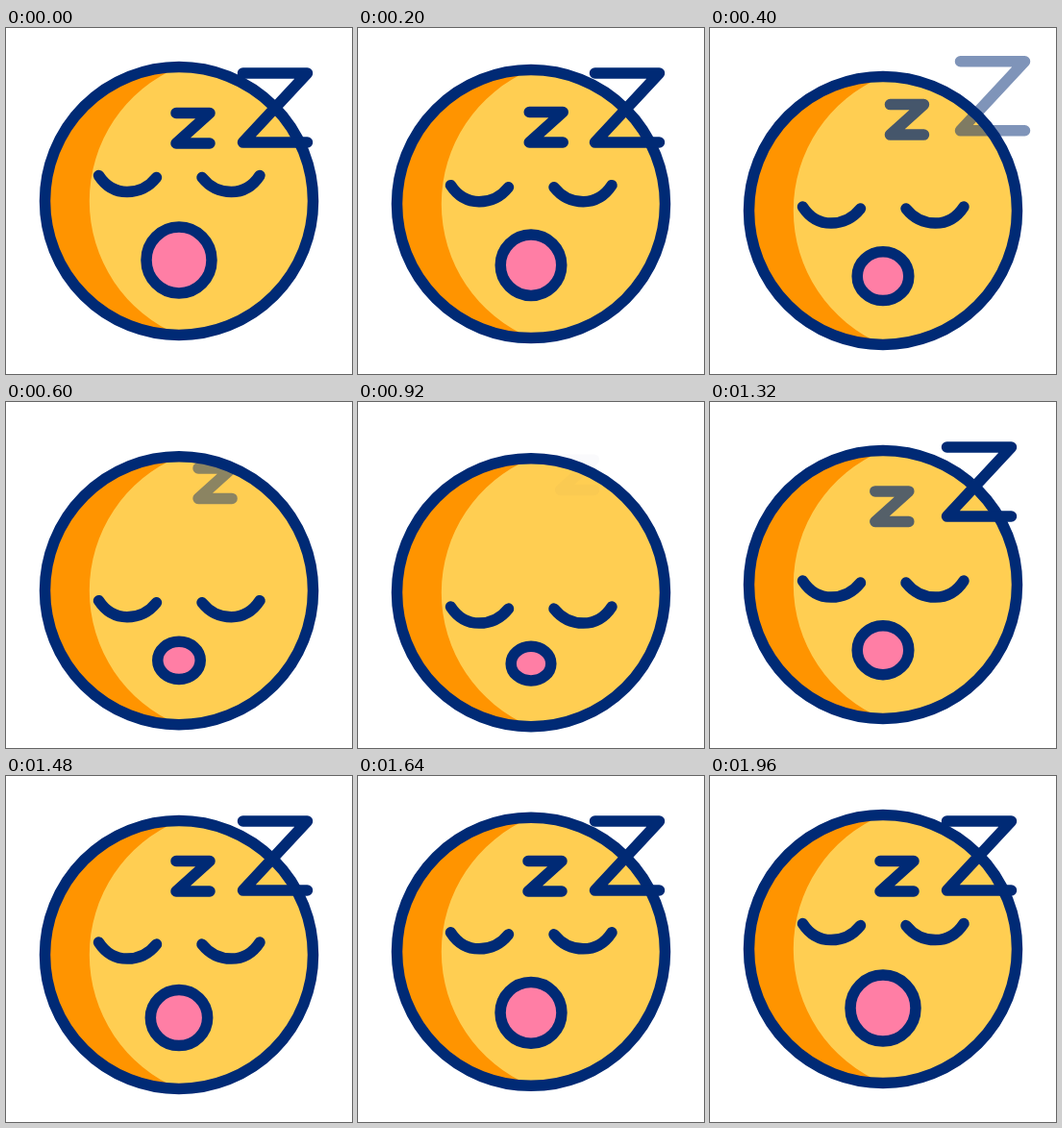
These frames come from a looping animation (360 by 360 pixels, 2000 ms). An HTML page:

```html
<!DOCTYPE html>
<html lang="en">
<head>
<meta charset="utf-8">
<title>Sleeping face</title>
<style>
html, body { margin: 0; height: 100%; overflow: hidden; background: #fff; }
svg { display: block; width: 100vw; height: 100vh; }
.line { fill: none; stroke: #002a75; stroke-width: 11.5; stroke-linecap: round; stroke-linejoin: round; }
</style>
</head>
<body>
<svg viewBox="0 0 360 360">
  <g id="face">
    <circle cx="180" cy="180" r="139.5" fill="#ffce52"/>
    <path d="M180 40.500A139.500 139.500 0 0 0 180 319.500A151 151 0 0 1 180 40.500" fill="#ff9400"/>
    <circle class="line" cx="180" cy="180" r="139.5"/>
  </g>
  <g id="eyes" class="line">
    <path id="eye" d="M96.500 153.500C103 163.500 113 170.500 126 170.500C138 170.500 149 165 156.500 155.500"/>
    <use href="#eye" transform="matrix(-1 0 0 1 360.500 0)"/>
  </g>
  <ellipse id="mouth" class="line" cx="180" style="fill:#ff7ea5"/>
  <path id="small" class="line" d="M177 88.500H212L177 120H212"/>
  <path id="big" class="line" d="M246.500 47H313.500L246.500 119H313.500"/>
</svg>
<script>
const LOOP = 2000, STEP = 40, DEEP = 800;
const get = id => document.getElementById(id);
const [face, eyes, mouth, small, big] = ['face', 'eyes', 'mouth', 'small', 'big'].map(get);

const ramp = (t, a, b) => Math.min(1, Math.max(0, (t - a) / (b - a)));
const smooth = u => u * u * (3 - 2 * u);

// cubic-bezier(a, 0, b, 1), solved by bisection
function ease(x, a, b) {
  let lo = 0, hi = 1;
  for (let i = 0; i < 24; i++) {
    const s = (lo + hi) / 2, r = 1 - s;
    if (3 * a * s * r * r + 3 * b * s * s * r + s * s * s < x) lo = s;
    else hi = s;
  }
  return smooth(lo);
}

// How far the head has nodded: 0 up, 1 down
const nod = t => t < DEEP
  ? ease(t / DEEP, .33, .62)
  : 1 - ease((t - DEEP) / (LOOP - DEEP), .33, .54);

const shift = (el, x, y) => el.setAttribute('transform', `translate(${x} ${y})`);

// A letter drifts up and away, then returns from the lower left
function drift(el, t, move, fade, enter, dx, dy) {
  const leaving = t < fade[1];
  const out = smooth(ramp(t, ...move));
  const back = ramp(t, ...enter), gap = 1 - smooth(back);
  if (leaving) shift(el, dx * out, dy * out);
  else shift(el, -20 * gap, 17 * gap);
  el.setAttribute('opacity', leaving ? 1 - ramp(t, ...fade) : back);
}

function draw(now) {
  const t = Math.floor(now % LOOP / STEP) * STEP;
  const p = nod(t);
  shift(face, 0, 18.8 * p);
  shift(eyes, 0, 61.5 * p);
  mouth.setAttribute('cy', 241.5 + 31.6 * p);
  mouth.setAttribute('rx', 34 - 13.6 * p);
  mouth.setAttribute('ry', 34.5 - 17.2 * p);
  drift(small, t, [110, 890], [200, 935], [1120, 1420], 33.5, -28.5);
  drift(big, t, [200, 600], [200, 600], [940, 1280], 28, -24.5);
}

let start;
function tick(now) {
  start ??= now;
  draw(now - start);
  requestAnimationFrame(tick);
}
draw(0);
requestAnimationFrame(tick);
</script>
</body>
</html>
```
